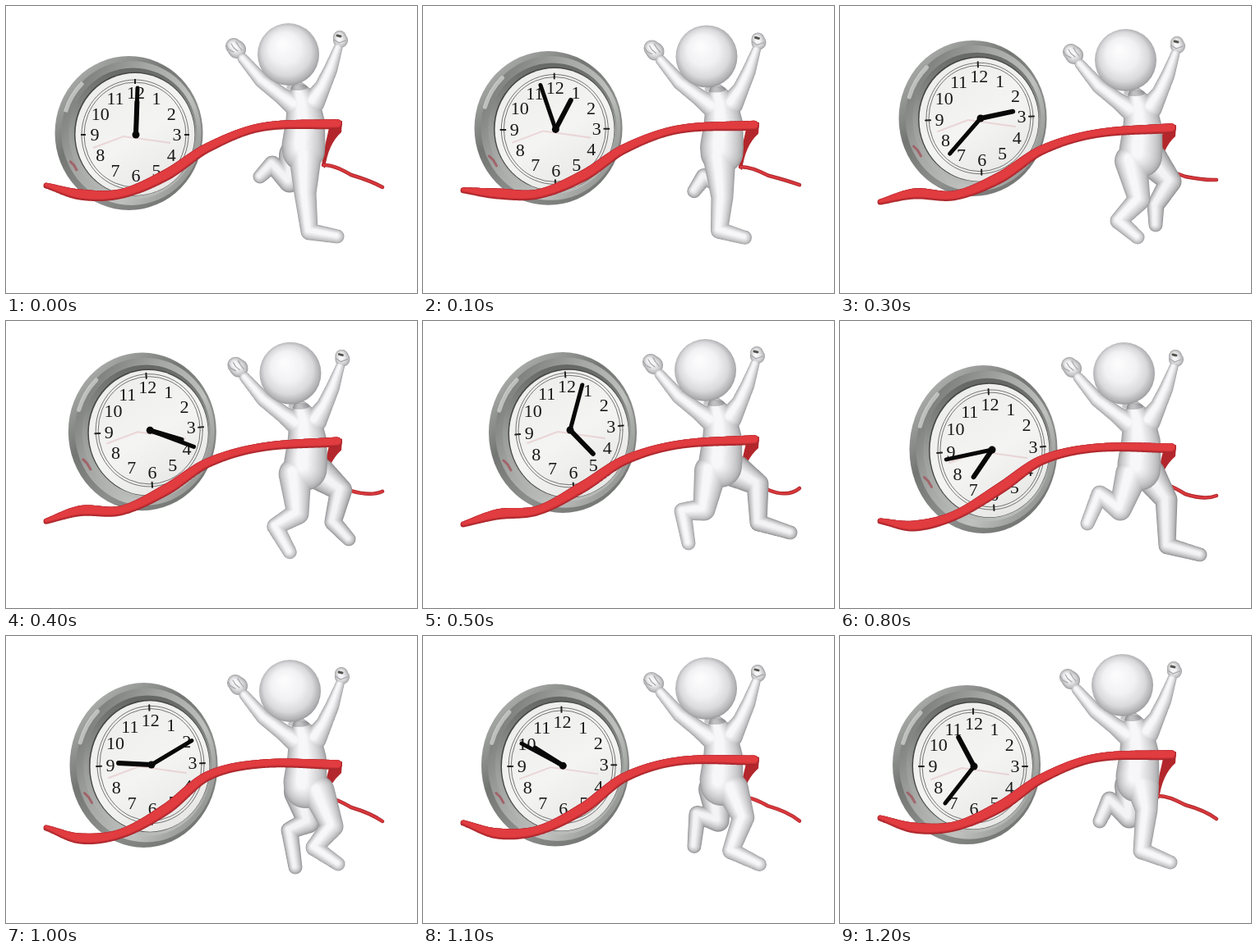
Recreate the animation shown at these times as an HTML page with a canvas. Size 500 by 350 pixels, loop 1.3 s.

```html
<!DOCTYPE html>
<html>
<head>
<meta charset="utf-8">
<style>
html, body { margin: 0; width: 100%; height: 100%; overflow: hidden; background: #fff; }
canvas { display: block; width: 500px; height: 350px; }
</style>
</head>
<body>
<canvas id="stage" width="500" height="350"></canvas>
<script>
const ctx = document.getElementById('stage').getContext('2d');
const STEPS = 13, STEP_MS = 100, TAU = Math.PI * 2, RAD = Math.PI / 180;

// Poses sit at steps 0, 3, 5, 6, 8, 10 and 12; the knots overlap both loop ends.
const KNOTS = [-3, -1, 0, 3, 5, 6, 8, 10, 12, 13, 16];

// centre x, centre y, vertical radius, dial tilt
const CLOCK = [[149.5, 155, 94, 0], [161.5, 137, 95, -2], [170, 136, 98, -4.5], [173, 145, 100, -4],
  [174.5, 156.5, 102.5, -3], [167.5, 157.5, 100.5, -1.5], [154, 157, 97, 0]];
// hour and minute angles in degrees
const HANDS = [[2, 2], [78, 941], [136, 1455], [160, 1901], [214, 2778], [273, 3299], [332, 3818]];
const PIVOT = [[158, 157], [171, 137], [179, 133], [181, 143], [185, 157], [177, 157], [163, 159]];
const BOB = [[0, 0], [4, 7], [0, 1], [-1, 0], [2, 5], [2, 8], [0, 1]];
// hip x, then knee, ankle and toe points
const NEAR_LEG = [[364, 364, 228, 369, 275, 403, 281], [354, 364, 236, 339, 262, 362, 282],
  [350, 342, 230, 316, 232, 323, 271], [350, 327, 216, 304, 194, 281, 212],
  [355, 341, 230, 316, 211, 301, 247], [380, 397, 232, 375, 258, 404, 278],
  [368, 373, 212, 367, 262, 402, 276]];
const FAR_LEG = [[352, 345, 214, 324, 193, 309, 208], [380, 402, 214, 384, 243, 384, 267],
  [380, 407, 199, 408, 246, 447, 258], [378, 402, 208, 412, 265, 449, 255],
  [376, 397, 218, 398, 274, 438, 285], [358, 368, 227, 345, 237, 352, 282],
  [354, 352, 221, 328, 200, 316, 226]];
const RIBBON_X = [49, 90, 140, 195, 245, 310, 403];
const RIBBON_R = [3.5, 6.5, 6, 7, 6, 5.3, 6];
const RIBBON = [[219, 230, 229, 206, 173, 148, 144], [239, 229, 231, 209, 176, 156, 149],
  [248, 236, 231, 202, 170, 151, 145], [248, 243, 230, 204, 171, 150, 145],
  [244, 250, 237, 204, 170, 155, 155], [234, 247, 241, 211, 171, 156, 157],
  [222, 234, 232, 208, 174, 149, 145]];
const TAIL = [[194, 206, 221], [200, 208, 212], [190, 206, 204], [192, 206, 204],
  [198, 211, 213], [197, 209, 226], [195, 206, 223]];

function spline(knots, values, t) {
  const last = knots.length - 1;
  let i = 0;
  while (i < last - 1 && t >= knots[i + 1]) i++;
  const slope = j => {
    const a = Math.max(j - 1, 0), b = Math.min(j + 1, last);
    return (values[b] - values[a]) / (knots[b] - knots[a]);
  };
  const h = knots[i + 1] - knots[i], u = (t - knots[i]) / h, v = 1 - u;
  return v * v * (1 + 2 * u) * values[i] + u * u * (1 + 2 * v) * values[i + 1]
    + h * u * v * (v * slope(i) - u * slope(i + 1));
}

// Values of a looping set of poses; turn is what each value gains per loop.
function pose(rows, step, turn = []) {
  return rows[0].map((_, c) => {
    const col = rows.map(row => row[c]), gain = turn[c] || 0;
    const values = [col[5] - gain, col[6] - gain, ...col, col[0] + gain, col[1] + gain];
    return spline(KNOTS, values, step);
  });
}

function ellipse(x, y, rx, ry, fill) {
  ctx.beginPath();
  ctx.ellipse(x, y, rx, ry, 0, 0, TAU);
  if (fill) { ctx.fillStyle = fill; ctx.fill(); } else ctx.stroke();
}

function gradient(x0, y0, x1, y1, ...colors) {
  const g = ctx.createLinearGradient(x0, y0, x1, y1);
  colors.forEach((c, i) => g.addColorStop(i / (colors.length - 1), c));
  return g;
}

function line(color, width, ...pts) {
  ctx.strokeStyle = color;
  ctx.lineWidth = width;
  ctx.beginPath();
  pts.forEach(p => ctx.lineTo(...p));
  ctx.stroke();
}

function drawClock(step) {
  const [cx, cy, ry, tilt] = pose(CLOCK, step), [px, py] = pose(PIVOT, step);
  const [hour, minute] = pose(HANDS, step, [360, 4320]);
  const k = ry / 94, fx = cx + 7, fy = cy + 1;

  ellipse(cx, cy, 90, ry, gradient(cx - 70, cy - 70, cx + 60, cy + 80, '#aaacaa', '#747674', '#8d8f8d', '#737573'));
  ellipse(cx + 3, cy, 85, 88 * k, gradient(cx - 80, cy - 50, cx + 85, cy + 60, '#777977', '#a5a7a5', '#bfc1bf', '#8b8d8b'));
  ellipse(cx + 5, cy + .5, 78, 80 * k, gradient(cx, cy - 80, cx, cy + 80, '#666866', '#989a98', '#b9bbb9'));
  // highlight and reflection on the rim
  ctx.lineWidth = 5;
  ctx.strokeStyle = 'rgba(230,232,230,.6)';
  ctx.beginPath();
  ctx.ellipse(cx, cy, 81, 85 * k, 0, 3.45, 3.95);
  ctx.stroke();
  line('rgba(160,50,60,.55)', 3, [cx - 72, cy + 34], [cx - 67, cy + 39], [cx - 63, cy + 46]);
  ellipse(fx, fy, 73.5, 75.5 * k, '#454745');
  ellipse(fx + .5, fy + .5, 72.5, 74.5 * k, gradient(fx - 40, fy - 60, fx + 40, fy + 70, '#eeeeed', '#f4f4f3', '#e7e7e6'));

  ctx.strokeStyle = '#555';
  ctx.lineWidth = .8;
  ellipse(px - 1, py, 62, 64 * k);
  ellipse(px - 1, py, 65, 67 * k);
  line('rgba(200,110,115,.22)', 2, [px - 52, py + 16], [px - 15, py + 2], [px + 42, py + 10]);

  ctx.textAlign = 'center';
  ctx.textBaseline = 'middle';
  ctx.font = '22px "Liberation Serif", serif';
  for (let n = 1; n <= 12; n++) {
    const a = (n * 30 + tilt) * RAD, s = Math.sin(a), c = -Math.cos(a);
    ctx.fillStyle = '#181818';
    ctx.fillText(n, px + 50 * s, py + 50.5 * k * c + 1);
    if (n % 3 === 0) {
      line('#222', 2, [px - 1 + 60 * s, py + 62 * k * c], [px - 1 + 66 * s, py + 68 * k * c]);
    }
  }
  ctx.lineCap = 'round';
  for (const [angle, length, width] of [[hour, 40, 6], [minute, 57, 5]]) {
    const a = angle * RAD;
    line('#080808', width, [px, py], [px + length * Math.sin(a), py - length * Math.cos(a)]);
  }
  ellipse(px, py, 4.5, 4.5, '#080808');
}

// Joints are [x, y, radius]; shading builds up in ever smaller, lighter layers.
function drawLimbs(limbs, shade = 0) {
  const layers = 14;
  for (let n = 0; n < layers; n++) {
    const k = n / (layers - 1), g = Math.round(158 - shade + (89 + shade * .7) * k ** .6);
    ctx.fillStyle = `rgb(${g},${g},${g + 2})`;
    ctx.beginPath();
    for (const joints of limbs) {
      for (let i = 1; i < joints.length; i++) {
        const a = joints[i - 1], b = joints[i];
        const count = Math.ceil(Math.hypot(b[0] - a[0], b[1] - a[1]) / 1.5);
        for (let j = 0; j <= count; j++) {
          const [x, y, r] = a.map((v, c) => v + (b[c] - v) * j / count);
          const cx = x - r * k * .16, cy = y - r * k * .16, cr = r * (1 - .76 * k);
          ctx.moveTo(cx + cr, cy);
          ctx.arc(cx, cy, cr, 0, TAU);
        }
      }
    }
    ctx.fill();
  }
}

function legJoints(rows, step, bobY) {
  const [hip, kx, ky, ax, ay, tx, ty] = pose(rows, step);
  return [[hip, 182 + bobY, 20], [kx, ky, 13.5], [ax, ay, 10.5], [tx, ty, 8.5]];
}

function drawRunner(step) {
  const [dx, dy] = pose(BOB, step);
  const at = (x, y, r) => [x + dx, y + dy, r];
  drawLimbs([legJoints(FAR_LEG, step, dy)], 14);
  drawLimbs([
    [at(356, 101, 9), at(362, 120, 20), at(364, 143, 24), at(362, 170, 26.5), at(362, 176, 26)],
    [at(352, 121, 14), at(336, 110, 10.5), at(311, 91, 9), at(288, 64, 6.5)],
    [at(374, 117, 14), at(385, 99, 10), at(395, 77, 8.5), at(404, 51, 5.5)],
    [at(277, 49, 10), at(281, 53, 11)],
    [at(406, 38, 8), at(407, 42, 9)],
    legJoints(NEAR_LEG, step, dy)
  ]);

  ctx.save();
  ctx.translate(dx, dy);
  // fingers
  for (let i = 0; i < 3; i++) {
    line('#a4a4a7', 1.2, [268 + i * 6, 48 - i * 2], [271 + i * 6, 53 - i * 2], [277 + i * 5, 56 - i]);
  }
  line('#a4a4a7', 1.2, [399, 41], [405, 45], [413, 42]);
  line('#55544f', 3, [403, 36], [407, 37]);
  // neck shadow and head
  ellipse(354, 99, 13, 4, 'rgba(90,90,95,.35)');
  const ball = ctx.createRadialGradient(336, 46, 3, 343, 58, 39);
  [[0, '#fcfcfd'], [.45, '#f1f1f3'], [.75, '#d9d9dc'], [.93, '#b2b2b5'], [1, '#98989b']]
    .forEach(stop => ball.addColorStop(...stop));
  ellipse(343.5, 59, 37.5, 38, ball);
  ctx.restore();
}

function drawRibbon(ys) {
  for (const [color, lift, trim] of [['#a9262b', 0, 0], ['#c93136', .7, .8], ['#e13c40', 1, 1.8]]) {
    ctx.fillStyle = color;
    ctx.beginPath();
    for (let x = RIBBON_X[0]; x <= 403; x += .75) {
      const y = spline(RIBBON_X, ys, x) - lift, r = spline(RIBBON_X, RIBBON_R, x) - trim;
      ctx.moveTo(x + r, y);
      ctx.arc(x, y, r, 0, TAU);
    }
    ctx.fill();
  }
}

function drawTail(waist, [a, b, c]) {
  ctx.lineJoin = 'round';
  ctx.fillStyle = '#b3272c';
  ctx.beginPath();
  ctx.moveTo(409, waist - 4);
  ctx.lineTo(408, waist + 10);
  ctx.quadraticCurveTo(392, waist + 24, 388, a + 4);
  ctx.lineTo(384, a);
  ctx.quadraticCurveTo(388, waist + 24, 394, waist);
  ctx.fill();
  for (const [color, width] of [['#a9262b', 4.5], ['#d9383c', 2.8]]) {
    ctx.strokeStyle = color;
    ctx.lineWidth = width;
    ctx.beginPath();
    ctx.moveTo(386, a);
    ctx.quadraticCurveTo(398, a - 1, 420, b);
    ctx.quadraticCurveTo(444, b + (b - a) * .6, 458, c);
    ctx.stroke();
  }
}

let shown = -1;
function tick() {
  const step = Math.floor(performance.now() / STEP_MS) % STEPS;
  if (step !== shown) {
    shown = step;
    const ys = pose(RIBBON, step);
    ctx.clearRect(0, 0, 500, 350);
    drawClock(step);
    drawTail(ys[6], pose(TAIL, step));
    drawRunner(step);
    drawRibbon(ys);
  }
  requestAnimationFrame(tick);
}
tick();
</script>
</body>
</html>
```
